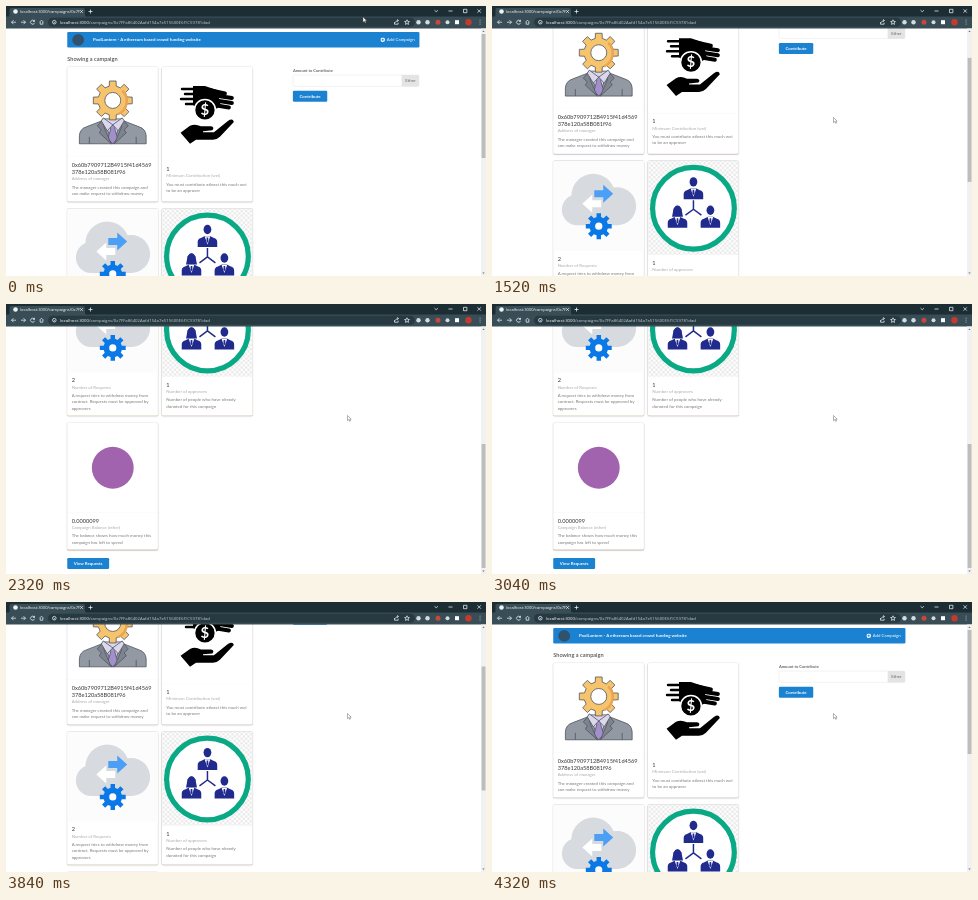
These frames come from a looping animation (480 px wide and 270 px high, 4.4 s). An HTML page:

```html
<!DOCTYPE html>
<html lang="en">
<head>
<meta charset="utf-8">
<title>Campaign page</title>
<style>
html, body { margin: 0; width: 100%; height: 100%; overflow: hidden; background: #fff; }
#stage { position: relative; width: 480px; height: 270px; overflow: hidden; }
#view { position: absolute; top: 22px; width: 475px; height: 248px; overflow: hidden; }
/* laid out in page pixels, shown at 5/16 */
#page { position: absolute; width: 1520px; height: 1511px; transform-origin: 0 0;
  font: 14px/20px Lato, sans-serif; color: rgba(0,0,0,.8); }
#page > *, .menu > * { position: absolute; white-space: nowrap; }
.menu { left: 196px; top: 13px; width: 1127px; height: 49px; background: #1b82d2;
  border-radius: 4px; color: #fff; line-height: 49px; }
h3 { left: 196px; top: 87px; margin: 0; font: 18px/23px Lato, sans-serif; }
.card { width: 290px; border-radius: 4px; background: #fff; }
.card svg { display: block; width: 290px; border-bottom: 1px solid #e4e4e4; box-sizing: border-box; border-radius: 4px 4px 0 0; }
.text { padding: 14px; color: rgba(0,0,0,.52); }
.text b { display: block; font: 18px/23.1px Lato, sans-serif; color: rgba(0,0,0,.8); }
.text i { display: block; font-style: normal; color: rgba(0,0,0,.33); margin-bottom: 7px; }
label { left: 918px; top: 126px; font-weight: 700; font-size: 13px; color: rgba(0,0,0,.6); }
.field { left: 918px; top: 150px; width: 403px; height: 37px; border: 1px solid #d8d9da; border-radius: 4px; box-sizing: border-box; }
.unit { left: 1266px; top: 150px; width: 56px; height: 37px; background: #e4e4e4; border-radius: 0 4px 4px 0;
  color: rgba(0,0,0,.55); text-align: center; line-height: 37px; }
.button { height: 35px; background: #1b82d2; color: #fff; border-radius: 4px; font-weight: 700; line-height: 35px; text-align: center; }
#frame { position: absolute; left: 0; top: 0; }
#frame text { font-family: "Open Sans", sans-serif; }
</style>
</head>
<body>
<div id="stage">
  <div id="view"><div id="page">
    <div class="menu">
      <svg style="left:15px;top:5px" width="40" height="40"><circle cx="20" cy="20" r="19" fill="#31526d"/></svg>
      <b style="left:82px">PoolLantern - A ethereum based crowd funding website</b>
      <svg style="left:1002px;top:17px" width="15" height="15"><circle cx="7.5" cy="7.5" r="7.3" fill="#fff"/><path d="M3.5 7.5h8M7.5 3.5v8" stroke="#1b82d2" stroke-width="2.4"/></svg>
      <span style="left:1022px">Add Campaign</span>
    </div>
    <h3>Showing a campaign</h3>
    <label>Amount to Contribute</label>
    <div class="field"></div><div class="unit">Ether</div>
    <div class="button" style="left:918px;top:201px;width:110px">Contribute</div>
    <div class="button" style="left:196px;top:1459px;width:134px">View Requests</div>
  </div></div>

  <svg id="frame" width="480" height="270">
    <path fill="#1c2d33" d="M0 0H480V11H0z"/>
    <path fill="#384d56" d="M0 22.500V10.500H2Q3.500 10.500 3.500 9V3.500Q3.500 2 5 2H77Q79 2 79 3.500V9Q79 10.500 80.500 10.500H480V22.500z"/>
    <rect x="42" y="11.700" width="367" height="9" rx="4.500" fill="#283a41"/>
    <circle cx="9.500" cy="5.500" r="2.300" fill="#eef2f4"/>
    <text x="14" y="7.100" font-size="4.100" fill="#fff">localhost:3000/campaigns/0x7F</text>
    <text x="54" y="17.900" font-size="4.300" fill="#c3cdd1"><tspan fill="#fff">localhost:3000</tspan>/campaigns/0x7FFa86402Aafd154a7e515600E6f1C59781dad</text>
    <g fill="none" stroke="#eef2f4" stroke-width=".75">
      <path d="M74.200 4.200l2.600 2.600m0-2.600l-2.600 2.600M82.500 5.500h4m-2-2v4"/>
      <path d="M10 16.200H5.500m2-2l-2 2 2 2M15 16.200h4.500m-2-2l2 2-2 2"/>
      <path d="M28.300 15.200a2 2 0 1 0 .2 1.600M28.500 13.800v1.600h-1.600M33.500 16.200l2-2 2 2M34.200 16v2.200h2.600V16"/>
      <path d="M428.500 4.200l1.700 1.600 1.700-1.600M442.500 5h4M457.500 3.300h3.400v3.400h-3.400zM471.500 3.300l3.400 3.400m0-3.400l-3.400 3.400"/>
      <path d="M388.500 16v2.200h3.600v-1.500M389.500 16.500q.3-2 2.700-2m-1-1.200l1.300 1.200-1.300 1.300"/>
      <path d="M401 13.800l.7 1.600 1.700.2-1.300 1.100.4 1.700-1.500-.9-1.500.9.400-1.700-1.300-1.100 1.700-.2z"/>
      <circle cx="48.300" cy="16.200" r="1.800"/><path d="M48.300 16v1.300"/>
    </g>
    <g fill="#d5dcdf">
      <circle cx="412.500" cy="16.200" r="2.200"/><circle cx="421.500" cy="16.200" r="2.200"/>
      <circle cx="432" cy="16.200" r="2.500" fill="#c9463c"/><circle cx="441.500" cy="16.200" r="2"/>
      <rect x="449" y="14.200" width="4" height="4" fill="#fff"/>
      <circle cx="462.500" cy="16.200" r="3.200" fill="#c63a2d"/>
      <path d="M473.600 13.700h.9v.9h-.9zm0 2h.9v.9h-.9zm0 2h.9v.9h-.9z"/>
    </g>
    <path fill="#f1f1f1" d="M475 22.500h5v247.500h-5z"/>
    <path fill="#777" d="M476.300 26l1.200-1.500 1.200 1.500zm0 240.500l1.200 1.500 1.200-1.500z"/>
    <rect id="thumb" x="475.600" y="28" width="3.900" height="124" fill="#bdbdbd"/>
    <path id="cursor" d="M0 0V5.200L1.300 4 2.200 5.900 3 5.500 2.200 3.700H3.700z" fill="#fff" stroke="#555" stroke-width=".45"/>
  </svg>
</div>
<script>
const $ = id => document.getElementById(id);
const SCALE = 0.3125;

function gear(cx, cy, outer, inner, attrs) {
  const pts = [];
  for (let i = 0; i < 8; i++)
    for (const [off, r] of [[-.24, inner], [-.17, outer], [.17, outer], [.24, inner]]) {
      const a = i * Math.PI / 4 + off;
      pts.push((cx + r * Math.sin(a)).toFixed(2) + ',' + (cy - r * Math.cos(a)).toFixed(2));
    }
  return `<polygon points="${pts.join(' ')}" stroke-linejoin="round" ${attrs}/>`;
}

const person = (x, y, hair = '') => `<g transform="translate(${x} ${y})" fill="#202b8d">${hair}
  <ellipse cy="4.500" rx="3.900" ry="4.700"/>
  <path d="M-9.800 22V17Q-9.800 14-6.500 13L-2.500 11H2.500L6.500 13Q9.800 14 9.800 17V22z"/>
  <path d="M-2.800 11.200L0 19.500 2.800 11.200z" fill="#fff"/><path d="M-.8 12.500H.8L1 16 0 18-1 16z"/></g>`;

const boss = `
  <g stroke="#50555f" stroke-width=".8" stroke-linejoin="round">
    <path d="M73 138V130Q73.500 123 80 121L98 114H115L133 121Q139.500 123 140 130V138z" fill="#9399a3"/>
    <path d="M97 113L106.500 138 116 113z" fill="#d9d5ea"/>
    <path d="M103 119H110L108.500 123 111.500 133 106.500 138 101.500 133 104.500 123z" fill="#a28fcb"/>
    <path d="M97 113L91 120 95 124 93 127 105 138 98 122zM116 113L122 120 118 124 120 127 108 138 115 122z" fill="#7d838f"/>
    <path d="M97 112L106.500 119 101 125 95 115zM116 112L106.500 119 112 125 118 115z" fill="#dcd8ec"/>
    <path d="M83 138V131M130 138V131" fill="none"/>
    ${gear(106.5, 94.5, 19.8, 14.8, 'fill="#f6c46c"')}
    <path d="M112 108.200A14.500 14.500 0 0 0 116 84.500" fill="none" stroke="#eba552" stroke-width="2.500"/>
    <circle cx="106.500" cy="94.500" r="8" fill="#fff"/>
  </g>`;

const hands = `
  <g stroke="#000" stroke-linecap="round" fill="none">
    <path d="M176 83H190M179 88H192M175 93H190M180 98H192" stroke-width="2.500"/>
    <path d="M203 84L219 87.500M206 89L226 92M207 94L226 97M208 99L223 101.500" stroke-width="4"/>
  </g>
  <path d="M187 80H199L211 84 215 100 208 104H194L187 99z"/>
  <circle cx="199" cy="104" r="10.500" stroke="#fff" stroke-width="1.600"/>
  <text x="199" y="109.300" font-size="15" font-weight="700" fill="#fff" text-anchor="middle" font-family="Lato, sans-serif">$</text>
  <path d="M174.500 127L184 120Q189 117.500 195 120.500H205Q209 121.500 206.500 124.500L197 125.500V126.500H208L222 115Q227 112 228 116L214 131Q211 134 207 134H190L184 138z"/>`;

const cloud = `
  <path d="M61 58H153V150H61z" fill="#fcfcfc"/>
  <g fill="#d7dadf"><circle cx="85" cy="107.500" r="15.500"/><circle cx="101" cy="93.500" r="22"/>
    <circle cx="125" cy="104" r="19"/><path d="M85 100H125V123H85z"/></g>
  <path d="M102 88H111V82.500L121 91.500 111 100.500V95H102z" fill="#4ba0f5"/>
  <path d="M109 98H100V92.500L90 101.500 100 110.500V105H109z" fill="#fff"/>
  ${gear(106.5, 124, 13.2, 9.4, 'fill="#0b78e8"')}
  <circle cx="106.500" cy="124" r="3.600" fill="#fcfcfc"/>`;

const team = `
  <defs><pattern id="check" width="4.600" height="4.600" patternUnits="userSpaceOnUse">
    <path d="M0 0h2.300v2.300H0zM2.300 2.300h2.300v2.300H2.300z" fill="#e9e9e9"/></pattern></defs>
  <path d="M156 58H248V154H156z" fill="url(#check)"/>
  <circle cx="201.500" cy="106" r="41" fill="#fff" stroke="#0aa985" stroke-width="5.200"/>
  <path d="M201.500 98V107L193.500 113M201.500 107L209.500 113" stroke="#202b8d" stroke-width="1.500" fill="none"/>
  ${person(201.5, 75)}${person(218.5, 103.5)}
  ${person(185.5, 103.5, '<path d="M-4 3Q0-3 4 3L5.500 11H-5.500z"/>')}`;

const token = '<circle cx="106.500" cy="164" r="21" fill="#a263ae"/>';

function card(col, top, height, edge, box, art, title, meta, text) {
  const [x, y, h] = box;
  const el = document.createElement('div');
  el.className = 'card';
  el.style.cssText = `left:${196 + 303 * col}px;top:${top}px;height:${height}px;
    box-shadow:0 0 0 1px #d4d4d5,0 2px 0 0 ${edge},0 2px 4px 1px #d0d0d2`;
  el.innerHTML = `<svg viewBox="${x} ${y} 90.600 ${h * SCALE}" height="${h}" style="height:${h}px">${art}</svg>
    <div class="text"><b>${title}</b><i>${meta}</i>${text}</div>`;
  $('page').append(el);
}

card(0, 124.5, 430, '#9fb4cc', [61, 61, 287], boss, '0x60b7909712B4915f41d4569<br>378e120a58B081f96',
  'Address of manager', 'The manager created this campaign and<br>can make request to withdraw money');
card(1, 124.5, 430, '#cf9ca4', [156, 61, 301], hands, '1',
  'Minimum Contribution (wei)', 'You must contribute atleast this much wei<br>to be an approver');
card(0, 578, 425, '#e3bd66', [61, 58.5, 287], cloud, '2',
  'Number of Requests', 'A request tries to withdraw money from<br>contract. Requests must be approved by<br>approvers');
card(1, 578, 425, '#dda183', [156, 58.5, 301], team, '1',
  'Number of approvers', 'Number of people who have already<br>donated for this campaign');
card(0, 1027, 405, '#b89680', [61, 119, 287], token, '0.0000099',
  'Campaign Balance (ether)', 'The balance shows how much money this<br>campaign has left to spend');

function ease(t, from, to) {
  const p = Math.min(1, Math.max(0, (t - from) / (to - from)));
  return p * p * (3 - 2 * p);
}

function draw(now) {
  const t = Math.floor(now % 4400 / 80) * 80;
  const scroll = 224 * (ease(t, 1200, 2275) - ease(t, 3200, 4235));
  const move = ease(t, 0, 560);
  $('page').style.transform = `translateY(${-scroll}px) scale(${SCALE})`;
  $('thumb').setAttribute('y', 28 + scroll / 2);
  $('cursor').setAttribute('transform', `translate(${357 - 15.5 * move} ${11 + 100.5 * move})`);
  requestAnimationFrame(draw);
}
draw(performance.now());
</script>
</body>
</html>
```
